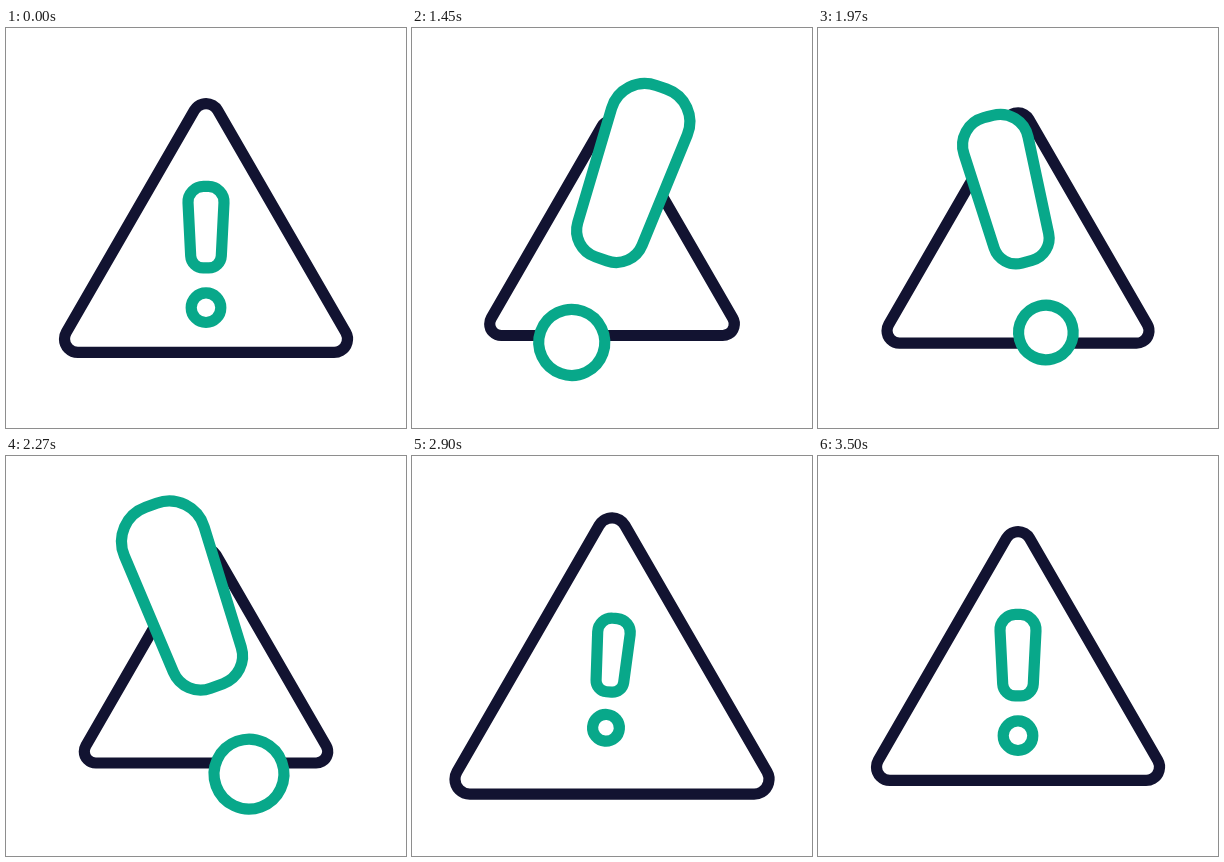
Recreate the animation shown at these times as an HTML page with a canvas. Size 400 by 400 pixels, loop 3.52 s.

```html
<!DOCTYPE html>
<html lang="en">
<head>
<meta charset="utf-8">
<title>Warning</title>
<style>
  html, body { margin: 0; width: 100%; height: 100%; overflow: hidden; background: #fff; }
  canvas { display: block; width: 100vw; height: 100vh; }
</style>
</head>
<body>
<canvas id="stage" width="400" height="400"></canvas>
<script>
const LOOP = 3520;
const REST = 1020;
const NAVY = '#121331';
const GREEN = '#08a88a';
const ctx = document.getElementById('stage').getContext('2d');

const progress = (time, from, to) => Math.min(1, Math.max(0, (time - from) / (to - from)));
// Eased step from 0 to 1
const ease = (time, from, to) => (1 - Math.cos(Math.PI * progress(time, from, to))) / 2;
// Smooth hump from 0 to 1 and back
const hump = (time, from, to) => Math.sin(Math.PI * progress(time, from, to)) ** 2;

// Swells, dips between two peaks, then falls below its size and settles
function markScale(t) {
  return 1 + 1.36 * ease(t, 995, 1335) - 0.8 * hump(t, 1330, 2240)
    - 1.455 * ease(t, 2270, 2905) + 0.095 * ease(t, 2905, 3320);
}

// Moves against the mark, a little later
function triangleScale(t) {
  return 1 - 0.14 * ease(t, 995, 1400) + 0.09 * hump(t, 1390, 2250)
    + 0.26 * ease(t, 2470, 2830) - 0.12 * ease(t, 2830, 3200);
}

function markAngle(t) {
  return 20 * ease(t, 995, 1390) - 40 * ease(t, 1390, 2145)
    + 24.8 * ease(t, 2330, 2900) - 4.8 * ease(t, 2900, 3380);
}

function outline(color) {
  ctx.fillStyle = '#fff';
  ctx.strokeStyle = color;
  ctx.lineWidth = 11.2;
  ctx.fill();
  ctx.stroke();
}

function drawTriangle(scale) {
  const r = 13.4 * scale;
  const halfWidth = 128.1 * scale;
  const height = 111 * scale;
  ctx.beginPath();
  ctx.arc(0, -height, r, -Math.PI * 5 / 6, -Math.PI / 6);
  ctx.arc(halfWidth, height, r, -Math.PI / 6, Math.PI / 2);
  ctx.arc(-halfWidth, height, r, Math.PI / 2, Math.PI * 7 / 6);
  ctx.closePath();
  outline(NAVY);
}

function drawMark(scale, degrees) {
  // The mark lifts as it grows, so that it stays centred on the stage
  const centre = -0.8 - 46.7 * Math.max(0, scale - 1);
  const top = centre - 40.75 * scale;
  const bottom = centre + 40.75 * scale;
  const wide = 18.8 * scale;
  const narrow = 14.7 * scale;
  const topRadius = 15.5 * scale;
  const bottomRadius = 12.5 * scale;

  ctx.save();
  ctx.rotate(degrees * Math.PI / 180);
  ctx.beginPath();
  ctx.moveTo(0, top);
  ctx.arcTo(wide, top, narrow, bottom, topRadius);
  ctx.arcTo(narrow, bottom, -narrow, bottom, bottomRadius);
  ctx.arcTo(-narrow, bottom, -wide, top, bottomRadius);
  ctx.arcTo(-wide, top, 0, top, topRadius);
  ctx.closePath();
  outline(GREEN);

  ctx.beginPath();
  ctx.arc(0, centre + 80.5 * scale, 14.8 * scale, 0, Math.PI * 2);
  outline(GREEN);
  ctx.restore();
}

function draw(elapsed) {
  const time = elapsed % LOOP;
  const pose = time < REST ? 0 : time;
  ctx.setTransform(1, 0, 0, 1, 0, 0);
  ctx.fillStyle = '#fff';
  ctx.fillRect(0, 0, 400, 400);
  ctx.translate(200, 200);
  drawTriangle(triangleScale(pose));
  drawMark(markScale(pose), markAngle(pose));
}

let start;
function tick(now) {
  start ??= now;
  draw(now - start);
  requestAnimationFrame(tick);
}
draw(0);
requestAnimationFrame(tick);
</script>
</body>
</html>
```
